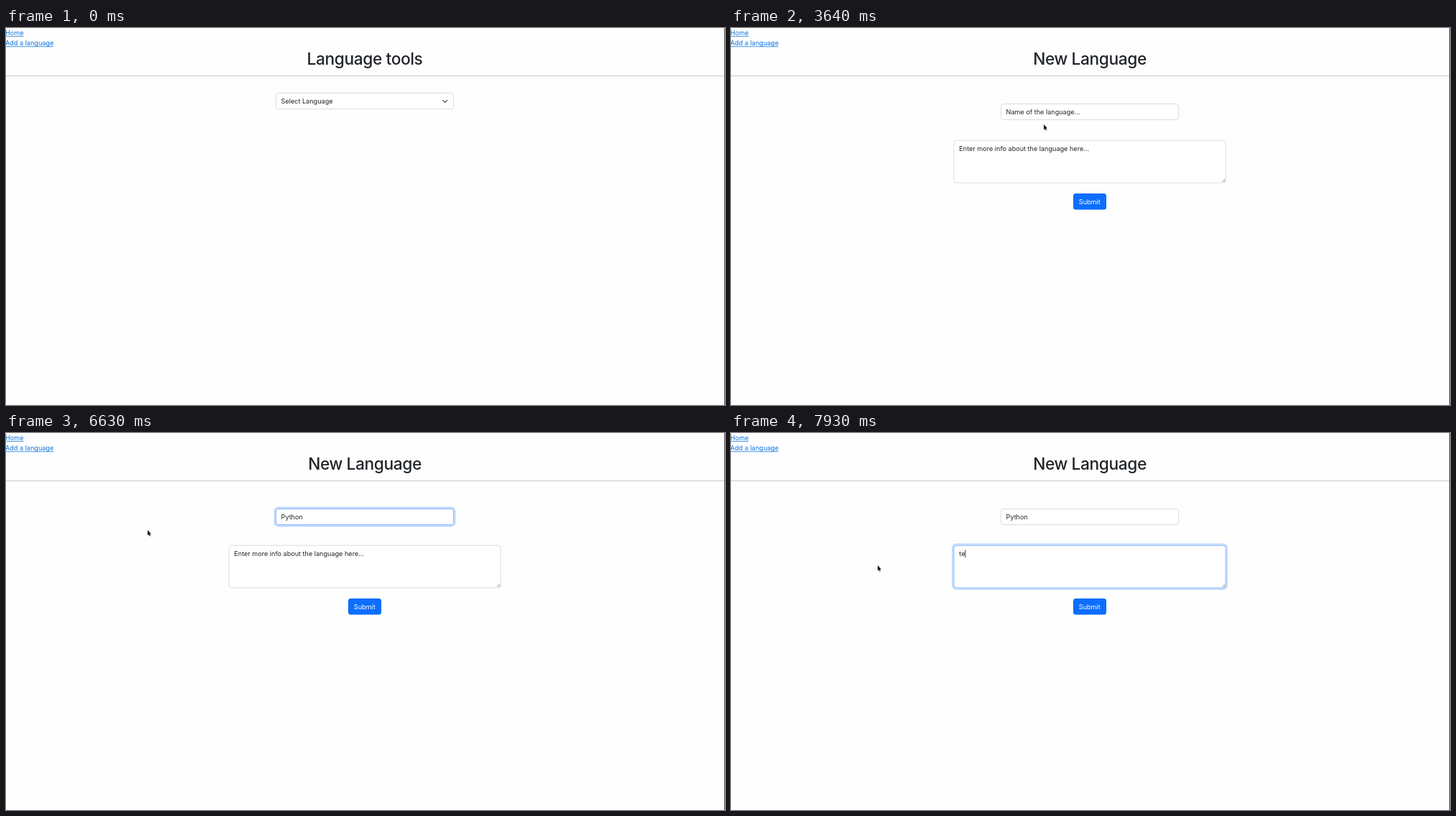
These frames come from a looping animation (1000 by 524 pixels, 8 s). An HTML page:

```html
<!DOCTYPE html>
<html lang="en">
<head>
<meta charset="utf-8">
<title>Language tools</title>
<style>
  html, body { margin: 0; width: 100%; height: 100%; overflow: hidden; background: #fefefe; }
  svg { display: block; }
  text { font: 400 9.1px Inter, "Open Sans", sans-serif; font-optical-sizing: none; fill: #212529; white-space: pre; }
  .title { font-size: 22.7px; font-weight: 500; letter-spacing: -.38px; text-anchor: middle; }
  .link { fill: #0f74dc; }
  .rule { stroke: #0f74dc; stroke-width: .8; }
  .box { fill: #fff; stroke: #d9dde1; }
  .ring { fill: none; stroke: #0d6efd; stroke-opacity: .25; stroke-width: 2.4; display: none; }
  .focus .box { stroke: #86b7fe; }
  .focus .ring { display: inline; }
  .sel { fill: #add3fb; }
  .caret { fill: #111; }
  .pointer { stroke-linejoin: round; stroke-linecap: round; }
</style>
</head>
<body>
<svg width="1000" height="524" viewBox="0 0 1000 524">
  <rect width="1000" height="524" fill="#fefefe"/>
  <text class="link" x="-1" y="10.3">Home</text>
  <text class="link" x="-1" y="24.4">Add a language</text>
  <path class="rule" d="M0 11.7H24.5M0 25.8H66"/>
  <rect y="66" width="999" height="1" fill="#c8c9ca"/>

  <g id="home">
    <text class="title" x="499" y="51.3">Language tools</text>
    <rect class="box" x="375.5" y="90.5" width="247" height="22" rx="3.5"/>
    <text x="382.6" y="105.3">Select Language</text>
    <path d="M607.6 100.3l3 3 3-3" fill="none" stroke="#343a40" stroke-width="1.1" stroke-linecap="round" stroke-linejoin="round"/>
  </g>

  <g id="form">
    <text class="title" x="499" y="51.3">New Language</text>
    <g id="name">
      <rect class="ring" x="373.8" y="103.8" width="250.4" height="25.4" rx="5"/>
      <rect class="box" x="375.5" y="105.5" width="247" height="22" rx="3.5"/>
      <rect class="sel" y="109.5" height="13.5"/>
      <text class="value" x="382.6" y="119.8"></text>
      <rect class="caret" y="111" width=".8" height="11"/>
    </g>
    <g id="info">
      <rect class="ring" x="308.3" y="154.6" width="381.4" height="62.2" rx="5"/>
      <rect class="box" x="310" y="156.3" width="378" height="58.8" rx="3.5"/>
      <rect class="sel" y="161" height="13.5"/>
      <text class="value" x="317.3" y="171"></text>
      <rect class="caret" y="162.3" width=".8" height="11"/>
      <path d="M683 214l4.5-4.5M685.5 214l2-2" stroke="#777" stroke-width=".7"/>
    </g>
    <rect x="476" y="230" width="46" height="22.5" rx="3.5" fill="#0d6efd"/>
    <text x="483.8" y="244.6" style="fill:#fff">Submit</text>
  </g>

  <rect x="999" width="1" height="524" fill="#4b4b4d"/>

  <g class="pointer" id="arrow">
    <path d="M0 0V7.4L1.7 5.9 2.8 8.4 4 7.9 2.9 5.4H5.1Z" fill="#111" stroke="#fff" stroke-width=".7" paint-order="stroke"/>
  </g>
  <g class="pointer" id="hand">
    <path d="M-1.2 5.5V.8Q-.5-.4.2.8V3.6Q1.2 2.9 1.8 3.8 2.8 3.2 3.2 4.2 4.3 3.8 4.5 5V7.2L3.5 9.6H-.6L-3 6.3Q-2.6 4.9-1.2 6.3Z" fill="#fff" stroke="#111" stroke-width=".9"/>
  </g>
  <g class="pointer" id="beam">
    <path d="M-1.4-4.4L0-3.7 1.4-4.4M0-3.7V3.9M-1.4 4.6L0 3.9 1.4 4.6M-1 1.6H1" fill="none" stroke="#222" stroke-width=".8"/>
  </g>
</svg>
<script>
const LOOP = 8000;
const NAME_HINT = "Name of the language...";
const INFO_HINT = "Enter more info about the language here...";
const $ = id => document.getElementById(id);

// time, x, y, shape
const pointerSteps = [
  [0, 0, 0, ""],
  [520, 786, 12, "arrow"], [650, 560, 38, "arrow"], [780, 300, 62, "arrow"], [910, 120, 66, "arrow"],
  [1300, 96, 56, "arrow"], [1430, 60, 42, "arrow"], [1560, 34, 32, "arrow"],
  [2340, 28, 24, "hand"], [2470, 22, 24, "hand"],
  [3250, 60, 44, "arrow"], [3380, 190, 86, "arrow"], [3510, 330, 120, "arrow"], [3640, 435, 134, "arrow"],
  [3770, 500, 130, "arrow"], [3900, 545, 118, "beam"], [4030, 560, 117, "beam"],
  [4160, 520, 116, "beam"], [4290, 290, 106, "beam"], [4420, 139, 98, "arrow"],
  [6630, 197, 135, "arrow"], [6760, 290, 150, "arrow"], [6890, 390, 162, "beam"], [7020, 470, 168, "beam"],
  [7150, 525, 169, "beam"], [7280, 541, 169, "beam"], [7410, 546, 169, "beam"],
  [7540, 400, 174, "beam"], [7670, 204, 184, "arrow"]
];

// each step changes only the listed properties
const pageSteps = [
  [0, { page: "home", focus: "", name: NAME_HINT, info: INFO_HINT, mark: "" }],
  [2860, { page: "form" }],
  [4160, { focus: "name", mark: "caret" }],
  [4290, { mark: "sel" }],
  [5330, { name: "P", mark: "caret" }],
  [5590, { name: "Py" }],
  [5850, { name: "Pyt" }],
  [5980, { name: "Pytho" }],
  [6110, { name: "Python" }],
  [6630, { mark: "" }],
  [7150, { mark: "caret" }],
  [7540, { focus: "info", mark: "sel" }],
  [7800, { info: "t", mark: "caret" }],
  [7930, { info: "te" }]
];

const show = (el, on) => { el.style.display = on ? "inline" : "none"; };

function drawField(id, state, pointerX) {
  const field = $(id), text = field.querySelector(".value");
  const caret = field.querySelector(".caret"), sel = field.querySelector(".sel");
  const focused = state.focus === id;
  field.classList.toggle("focus", focused);
  if (text.textContent !== state[id]) text.textContent = state[id];
  show(caret, focused && state.mark === "caret");
  show(sel, focused && state.mark === "sel");
  if (!focused) return;
  const start = +text.getAttribute("x");
  const end = start + text.getComputedTextLength();
  const from = Math.min(end, Math.max(start, pointerX));
  caret.setAttribute("x", end);
  sel.setAttribute("x", from);
  sel.setAttribute("width", end - from);
}

function draw(t) {
  const past = ([time]) => time <= t;
  const state = Object.assign({}, ...pageSteps.filter(past).map(step => step[1]));
  const [, x, y, shape] = pointerSteps.filter(past).pop();
  for (const id of ["home", "form"]) show($(id), state.page === id);
  if (state.page === "form") {
    drawField("name", state, x);
    drawField("info", state, x);
  }
  for (const id of ["arrow", "hand", "beam"]) {
    show($(id), shape === id);
    $(id).setAttribute("transform", `translate(${x} ${y})`);
  }
}

const start = performance.now();
function tick() {
  draw((performance.now() - start) % LOOP);
  requestAnimationFrame(tick);
}
tick();
</script>
</body>
</html>
```
